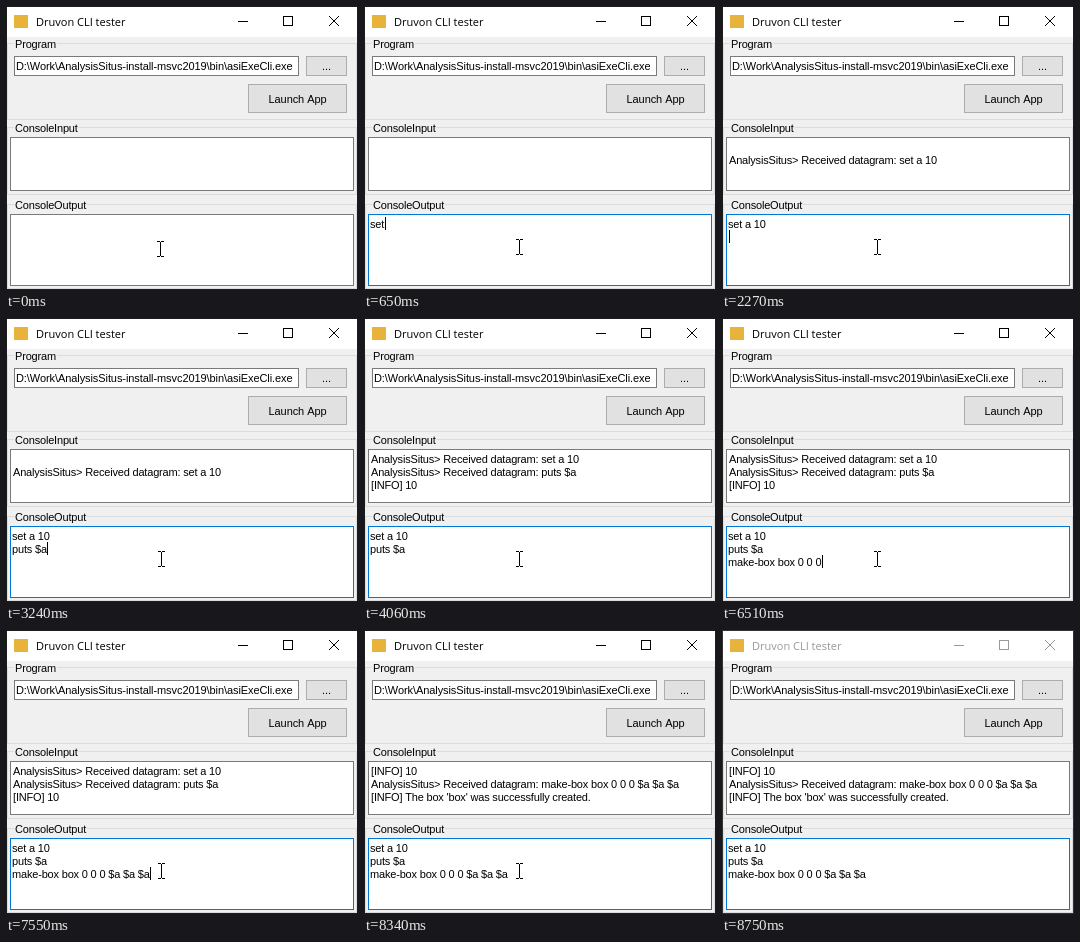
These frames come from a looping animation (352 by 284 pixels, 9340 ms). An HTML page with a canvas:

```html
<!DOCTYPE html>
<html lang="en">
<head>
<meta charset="utf-8">
<title>CLI tester</title>
<style>
  html, body { margin: 0; width: 100%; height: 100%; overflow: hidden; background: #f0f0f0; }
  canvas { display: block; width: 352px; height: 284px; }
</style>
</head>
<body>
<canvas id="stage" width="352" height="284"></canvas>
<script>
const ctx = document.getElementById('stage').getContext('2d');
const LOOP = 9340;
const FOCUS_AT = 230, LEAVE_AT = 8300, BLUR_AT = 8750;
const BLINK = 540;
const LINE_HEIGHT = 13;
const SANS = '11px "Liberation Sans", Arial, sans-serif';
const UI = { font: SANS, spacing: '-0.18px' };
const WIDE = { font: SANS, spacing: '-0.08px' };
const TITLE = { font: '11px "Open Sans", "Noto Sans", sans-serif', spacing: '0px' };

// Spreads the keystrokes of a text evenly between two times.
function typed(text, start, end) {
  const step = text.length > 1 ? (end - start) / (text.length - 1) : 0;
  return [...text].map((char, i) => ({ char, at: Math.round(start + i * step) }));
}

const keys = [
  ...typed('set', 430, 650),
  ...typed(' a 10', 790, 1030),
  ...typed('\n', 1170, 1170),
  ...typed('puts $a', 2410, 3240),
  ...typed('\n', 3440, 3440),
  ...typed('m', 4310, 4310),
  ...typed('ake-box bo', 4510, 5370),
  ...typed('x ', 5440, 5550),
  ...typed('0 0 0 $', 5750, 6680),
  ...typed('a $a $a', 6820, 7550),
  ...typed('\n', 7680, 7680)
];

const received = 'AnalysisSitus> Received datagram: ';
const replies = [
  { at: 0, line: '' },
  { at: 1240, line: received + 'set a 10' },
  { at: 3440, line: received + 'puts $a' },
  { at: 3580, line: '[INFO] 10' },
  { at: 7680, line: received + 'make-box box 0 0 0 $a $a $a' },
  { at: 7890, line: "[INFO] The box 'box' was successfully created." }
];

function rect(x, y, w, h, color) {
  ctx.fillStyle = color;
  ctx.fillRect(x, y, w, h);
}

function frame(x, y, w, h, fill, border) {
  rect(x, y, w, h, border);
  rect(x + 1, y + 1, w - 2, h - 2, fill);
}

function setStyle(style) {
  ctx.font = style.font;
  ctx.letterSpacing = style.spacing;
}

function text(value, x, y, style = UI, color = '#000', align = 'left') {
  setStyle(style);
  ctx.fillStyle = color;
  ctx.textAlign = align;
  ctx.fillText(value, x, y);
}

function textWidth(value) {
  setStyle(UI);
  return ctx.measureText(value).width;
}

function button(label, x, y, w, h, baseline) {
  frame(x, y, w, h, '#e1e1e1', '#adadad');
  text(label, x + w / 2, baseline, WIDE, '#000', 'center');
}

function group(label, top, bottom, baseline) {
  frame(1, top, 350, bottom - top, '#f0f0f0', '#dcdcdc');
  rect(8, top, textWidth(label) + 2, 1, '#f0f0f0');
  text(label, 9, baseline);
}

function titleBar(active) {
  const color = active ? '#000' : '#999';
  rect(1, 1, 350, 30, '#fff');
  rect(8, 9, 14, 13, '#e8b33a');
  text('Druvon CLI tester', 30, 20, TITLE, color);
  rect(232, 15, 10, 1, color);
  frame(277, 10, 10, 10, '#fff', color);
  ctx.strokeStyle = color;
  ctx.lineWidth = 1;
  ctx.beginPath();
  ctx.moveTo(323, 10);
  ctx.lineTo(333, 20);
  ctx.moveTo(333, 10);
  ctx.lineTo(323, 20);
  ctx.stroke();
}

function editor(t) {
  const focused = t >= FOCUS_AT;
  frame(4, 208, 344, 72, '#fff', focused ? '#0078d7' : '#7a7a7a');
  const pressed = keys.filter(key => key.at <= t);
  const lines = pressed.map(key => key.char).join('').split('\n');
  lines.forEach((line, i) => text(line, 6, 222 + i * LINE_HEIGHT));

  const lastKey = pressed.length ? pressed[pressed.length - 1].at : FOCUS_AT;
  const caretOn = Math.floor((t - lastKey) / BLINK) % 2 === 0;
  if (focused && t < BLUR_AT && caretOn) {
    const row = lines.length - 1;
    const x = 7 + Math.floor(textWidth(lines[row]));
    rect(x, 211 + row * LINE_HEIGHT, 1, LINE_HEIGHT, '#000');
  }
}

function pointer(t) {
  if (t >= BLUR_AT) return;
  const leave = Math.max(0, (t - LEAVE_AT) / (BLUR_AT - LEAVE_AT));
  const x = t < 60 ? 154 : Math.round(155 + 60 * leave * leave);
  const y = t < 60 ? 243 : Math.round(241 + 60 * leave * leave);
  rect(x, y - 7, 1, 14, '#000');
  for (const end of [y - 8, y + 7]) {
    rect(x - 3, end, 3, 1, '#000');
    rect(x + 1, end, 3, 1, '#000');
  }
}

function draw(t) {
  const active = t < BLUR_AT;
  frame(0, 0, 352, 284, '#f0f0f0', active ? '#1c1c1c' : '#333');
  titleBar(active);

  group('Program', 37, 114, 42);
  frame(8, 50, 285, 20, '#fff', '#7a7a7a');
  text('D:\\Work\\AnalysisSitus-install-msvc2019\\bin\\asiExeCli.exe', 10, 64, WIDE);
  button('...', 300, 50, 41, 20, 64);
  button('Launch App', 242, 78, 99, 29, 97);

  group('ConsoleInput', 121, 189, 126);
  frame(4, 131, 344, 54, '#fff', '#7a7a7a');
  replies.filter(reply => reply.at <= t).slice(-3)
    .forEach((reply, i) => text(reply.line, 7, 145 + i * LINE_HEIGHT));

  group('ConsoleOutput', 198, 283, 203);
  editor(t);
  pointer(t);
}

function tick() {
  draw(performance.now() % LOOP);
  requestAnimationFrame(tick);
}
tick();
</script>
</body>
</html>
```
